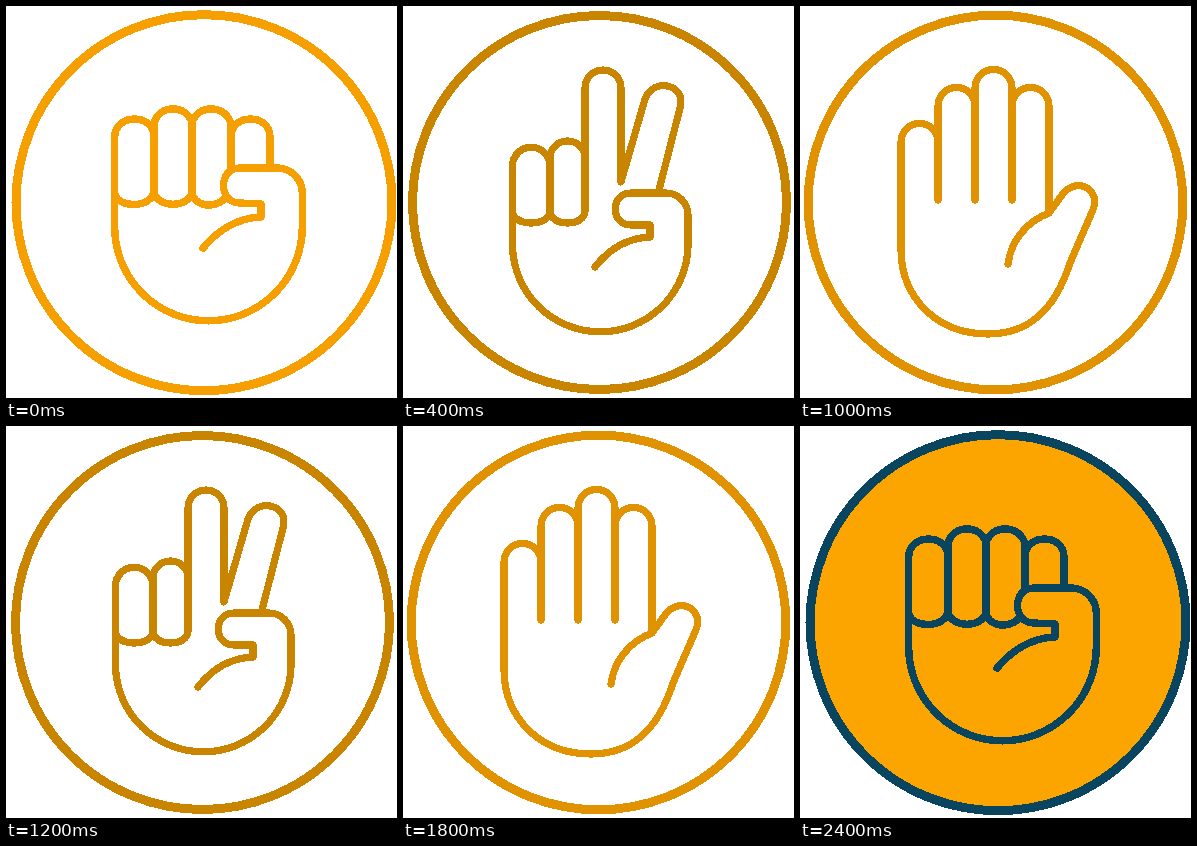
Write an HTML page that moves like this. It is 391x392 px and loops after 2600 ms.

```html
<!DOCTYPE html>
<html lang="en">
<head>
<meta charset="utf-8">
<title>Hand game</title>
<style>
  html, body { margin: 0; width: 100%; height: 100%; overflow: hidden; background: #fff; }
  svg { display: block; width: 100%; height: 100%; }
</style>
</head>
<body>
<svg viewBox="0 0 391 392" fill="none" stroke-linejoin="round" stroke-linecap="round" shape-rendering="crispEdges">
  <circle id="ring"/>
  <path id="hand"/>
</svg>
<script>
const ring = document.getElementById("ring");
const hand = document.getElementById("hand");

const poses = {
  rock: {
    cx: 198, cy: 196.7, r: 188, ringWidth: 9, width: 7.4,
    d: `M108.7 186V131C109 107 148 107 148 131V184C148 203 109 203 108.7 186
        V221A93.8 93.8 0 0 0 296.3 221V187A25 25 0 0 0 271 162H234C212 162 212 197 234 197
        L255 198V211C231 212 213 223 197 242
        M148 184V118C152 98 181 98 186 117V184C186 203 148 203 148 184
        M186 184C186 201 210 204 220 191
        M186 117C191 98 220 98 225 118V163
        M225 131C225 107 264 107 264 131V161`
  },
  paper: {
    cx: 195.5, cy: 196.5, r: 187.3, ringWidth: 9, width: 7.2,
    d: `M101 206V136A18.5 18.5 0 0 1 138 136V194
        M138 136V100A18.5 18.5 0 0 1 175 100V194
        M175 100V82A18.5 18.5 0 0 1 212 82V194
        M212 100A18.5 18.5 0 0 1 249 100V207
        L262 189C277 169 303 184 292 206L270 257
        C255 304 229 328 188 328C137 328 101 292 101 243V206
        M249 207C226 216 211 235 208 258`
  },
  scissors: {
    cx: 196.5, cy: 196.5, r: 187, ringWidth: 9, width: 7.2,
    d: `M109.5 205V160A18.7 18.7 0 0 1 147 160V205C147 221 109.5 221 109.5 205
        V241A87.8 87.8 0 0 0 285 241V209A22 22 0 0 0 263 187H228C207 187 207 219 228 219
        H247V231C223 232 206 243 192 261
        M147 205V150A17.7 17.7 0 0 1 182 150V205C182 221 147 221 147 205
        M182 150V82A18 18 0 0 1 218 82V176L242 93
        C251 70 284 79 277 102L256 184`
  }
};

const beats = [["rock", 200], ["paper", 200], ["scissors", 400]];
const ROUND = 800, LOOP = 2600;
const colors = { rock: "#f5a000", paper: "#e09200", scissors: "#c98400" };

function draw(name, chosen) {
  const p = poses[name];
  const stroke = chosen ? "#0a4560" : colors[name];
  const set = (el, attrs) => {
    for (const key in attrs) el.setAttribute(key, attrs[key]);
  };
  set(ring, {
    cx: p.cx, cy: p.cy, r: p.r, stroke,
    "stroke-width": p.ringWidth, fill: chosen ? "#fca400" : "none"
  });
  set(hand, { d: p.d, stroke, "stroke-width": p.width });
}

function render(now) {
  const t = now % LOOP;
  let left = t % ROUND, i = 0;
  while (left >= beats[i][1]) left -= beats[i++][1];
  // Three rounds, then the winning hand lights up.
  draw(beats[i][0], t >= 3 * ROUND);
}

const start = performance.now();
function tick() {
  render(performance.now() - start);
  requestAnimationFrame(tick);
}
tick();
</script>
</body>
</html>
```
